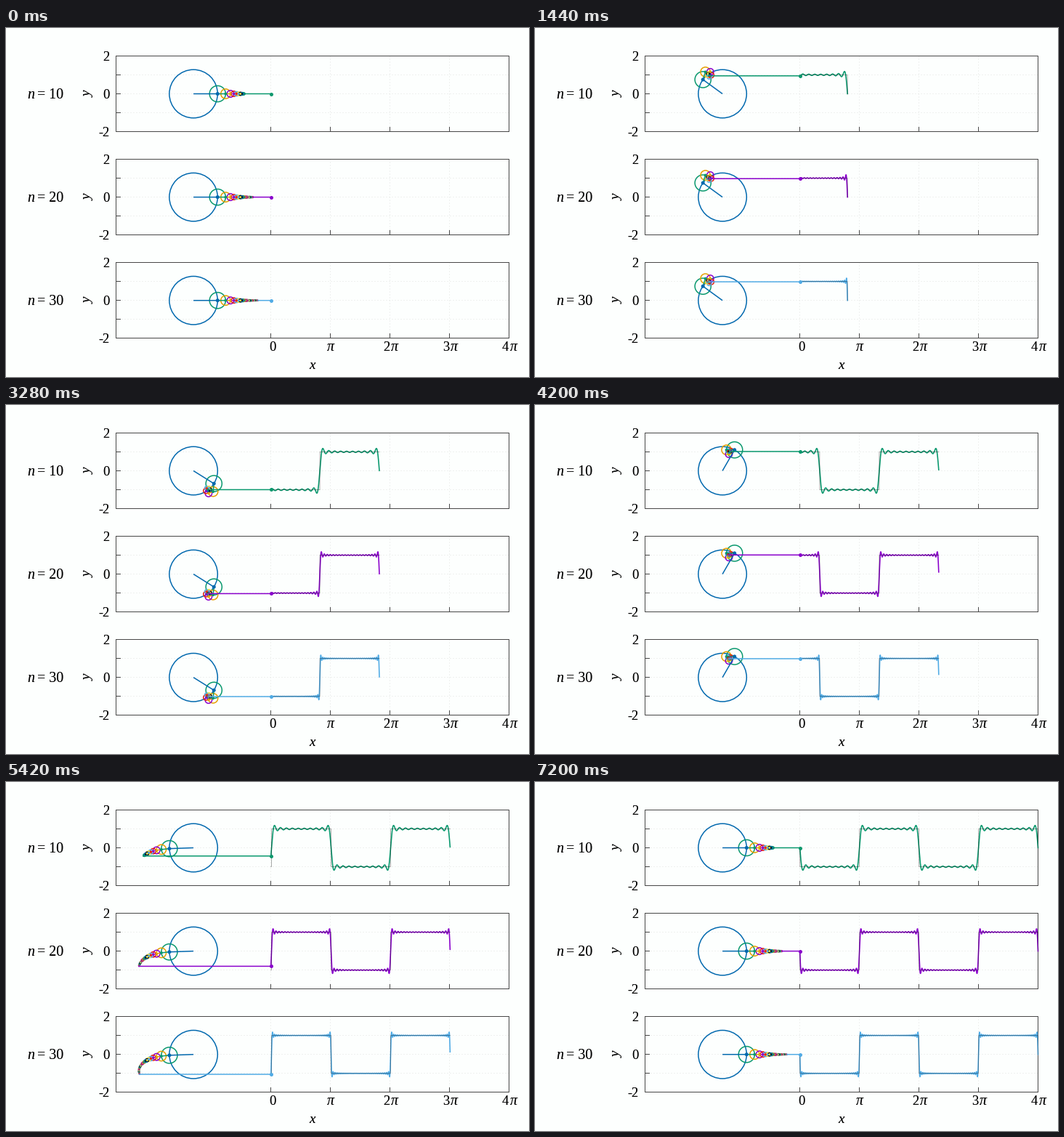
A matplotlib script that plays this animation: 720x480 px, repeating every 7.22 s.

```python
import numpy as np
import matplotlib.pyplot as plt
from matplotlib.animation import FuncAnimation
from matplotlib.collections import LineCollection

W, H, DPI = 720, 480, 100
PT = 72 / DPI                      # points per pixel
FRAMES, INTERVAL = 361, 20

X0, PI_PX = 364.63, 81.97          # pixel of x = 0, pixels per pi
UNIT = PI_PX / np.pi
LEFT, RIGHT = X0 - 2.6 * PI_PX, X0 + 4 * PI_PX
HUB = X0 - 1.3 * PI_PX
HALF = 2 * UNIT
ROWS = [(10, 90.5), (20, 232.6), (30, 374.7)]

COLORS = ["#0068ae", "#08986d", "#e69f00", "#8a00cc",
          "#e51e10", "#50abe5", "#efdf3c", "#101010"]
INK = "#484848"
BG = "#fdfffe"

fig = plt.figure(figsize=(W / DPI, H / DPI), dpi=DPI, facecolor=BG)
ax = fig.add_axes([0, 0, 1, 1])
ax.set_xlim(0, W)
ax.set_ylim(H, 0)
ax.axis("off")


def text(x, y, s, size=18.5, ha="center", va="baseline", italic=False, rot=0):
    # the second, fainter pass gives the letters a little more weight
    for alpha in (1, 0.5):
        ax.text(x, y, s, fontsize=size * PT, ha=ha, va=va, rotation=rot,
                family="Liberation Serif", color="black", alpha=alpha,
                style="italic" if italic else "normal")


def line(xs, ys, color=INK, lw=1.0, **kw):
    return ax.plot(xs, ys, color=color, lw=lw * PT, snap=False, **kw)[0]


def rule(xs, ys, **kw):
    """Axis-aligned line centred on whole pixels."""
    line(np.floor(xs) + 0.5, np.floor(ys) + 0.5, **kw)


def draw_frame(n, cy):
    top, bottom = cy - HALF, cy + HALF
    grid = dict(color="#e2e4e2", ls=(0, (1, 3)), zorder=0)
    for v in (-1, 0, 1):
        y = cy - v * UNIT
        rule([LEFT, RIGHT], [y, y], **grid)
        rule([LEFT, LEFT + 6], [y, y], zorder=1)
    for k in range(5):
        x = X0 + k * PI_PX
        rule([x, x], [top, bottom], **grid)
        rule([x, x], [bottom, bottom - 6], zorder=1)
    rule([LEFT, RIGHT, RIGHT, LEFT, LEFT],
         [top, top, bottom, bottom, top], zorder=1)
    for v in (2, 0, -2):
        text(142.5, cy - v * UNIT + 6.2, str(v), ha="right")
    text(28.8, cy + 6.5, "n", 20, ha="left", italic=True)
    text(79.2, cy + 6.5, f"= {n}", 20, ha="right")
    text(113.5, cy, "y", 19, va="center", italic=True, rot=90)


class Row:
    def __init__(self, n, cy):
        self.cy = cy
        self.odd = 2 * np.arange(1, n + 1) - 1
        self.amp = 4 / np.pi / self.odd
        cols = [COLORS[k % len(COLORS)] for k in range(n)]
        radius = self.amp * UNIT
        dot = 2.5 * np.arange(1, n + 1) ** -0.35
        zero = np.zeros(n)

        self.curve = line([], [], cols[-1], 1.6, zorder=2)
        self.square = line([], [], "black", 0.9, alpha=0.36, zorder=3)
        self.rings = ax.scatter(zero, zero, s=(2 * radius * PT) ** 2,
                                facecolors="none", edgecolors=cols,
                                linewidths=1.5 * PT, zorder=4)
        self.arms = LineCollection([], colors=cols, linewidths=1.5 * PT,
                                   snap=False, zorder=5)
        ax.add_collection(self.arms, autolim=False)
        self.dots = ax.scatter(zero, zero, s=(2 * dot * PT) ** 2, c=cols,
                               linewidths=0, zorder=6)
        self.link = line([], [], cols[-1], 1.5, zorder=7)
        self.pen = ax.scatter([X0], [cy], s=(5 * PT) ** 2, c=cols[-1:],
                              linewidths=0, zorder=8)

    def update(self, t, xs):
        ang = self.odd * t
        px = HUB + UNIT * np.r_[0, np.cumsum(self.amp * np.cos(ang))]
        py = self.cy - UNIT * np.r_[0, np.cumsum(self.amp * np.sin(ang))]
        pts = np.column_stack([px, py])
        self.rings.set_offsets(pts[:-1])
        self.dots.set_offsets(pts[1:])
        self.arms.set_segments(np.stack([pts[:-1], pts[1:]], axis=1))
        self.link.set_data([px[-1], X0], [py[-1], py[-1]])
        self.pen.set_offsets([[X0, py[-1]]])

        u = t - xs
        wave = np.sin(np.outer(u, self.odd)) @ self.amp
        step = np.sign(np.round(np.sin(u), 9))
        sx = X0 + xs * UNIT
        self.curve.set_data(sx, self.cy - wave * UNIT)
        self.square.set_data(sx, self.cy - step * UNIT)


for n, cy in ROWS:
    draw_frame(n, cy)

text(X0 + 2, 444, "0")
text(X0 + PI_PX, 444, "π", 20, italic=True)
for k in (2, 3, 4):
    text(X0 + k * PI_PX - 5, 444, str(k))
    text(X0 + k * PI_PX + 6, 444, "π", 20, italic=True)
text(421.3, 469, "x", 19, italic=True)

rows = [Row(n, cy) for n, cy in ROWS]
GRID = np.linspace(0, 4 * np.pi, 2001)


def update(i):
    t = 4 * np.pi * i / (FRAMES - 1)
    xs = GRID[GRID <= t + 1e-9]
    if len(xs) < 2:
        xs = xs[:0]
    for row in rows:
        row.update(t, xs)
    return []


anim = FuncAnimation(fig, update, frames=FRAMES, interval=INTERVAL,
                     init_func=lambda: update(0), repeat=True, blit=False)
plt.show()
```
